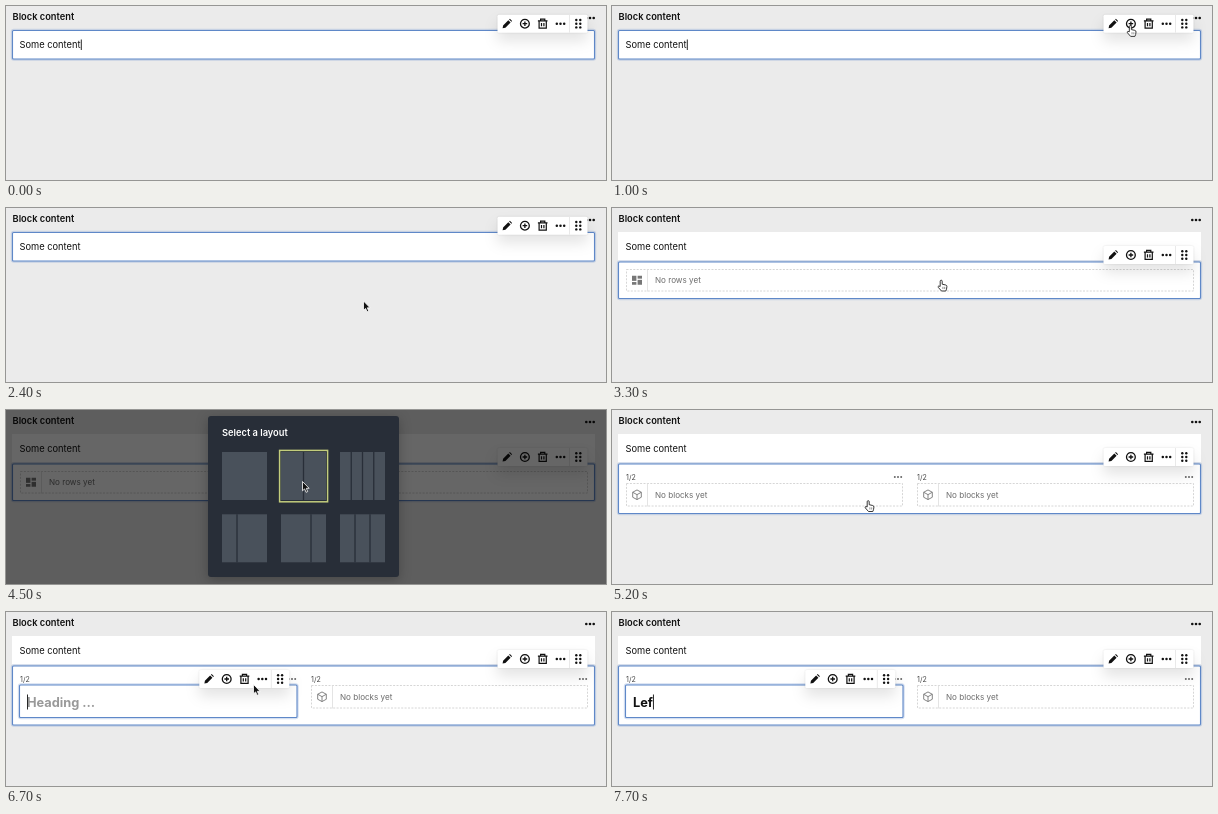
An HTML page that plays this animation: 600 by 174 pixels, repeating every 8000 ms.

```html
<!DOCTYPE html>
<html lang="en">
<head>
<meta charset="utf-8">
<title>Block editor</title>
<style>
html, body { margin: 0; width: 600px; height: 174px; overflow: hidden; background: #ebebeb; }
svg { display: block; }
text { font-family: Inter, "Open Sans", sans-serif; white-space: pre; }
.mono { font-family: "DejaVu Sans Mono", monospace; }
.bar { filter: drop-shadow(0 0 1px rgba(0,0,0,.12)) drop-shadow(0 8px 7px rgba(0,0,0,.11)); }
.dialog { filter: drop-shadow(0 3px 6px rgba(0,0,0,.25)); }
</style>
</head>
<body>
<svg id="stage" width="600" height="174" viewBox="0 0 600 174"></svg>
<script>
const LOOP = 8000, TICK = 100;
const PANEL = '#282e38', ITEM = '#14171b', GREEN = '#c9dba0', MUTED = '#b4b7bb';

// ---- drawing helpers (boxes are given by their edges) ----
const rect = (x1, y1, x2, y2, fill, extra = '') =>
  `<rect x="${x1}" y="${y1}" width="${x2 - x1}" height="${y2 - y1}" fill="${fill}" ${extra}/>`;
const text = (x, cy, size, str, fill = '#111', extra = '') =>
  `<text x="${x}" y="${cy + size * .36}" font-size="${size}" fill="${fill}" ${extra}>${str}</text>`;
const line = (d, color, width = 1, extra = '') =>
  `<path d="${d}" fill="none" stroke="${color}" stroke-width="${width}" ${extra}/>`;
const shape = (d, fill) => `<path d="${d}" fill="${fill}"/>`;
const at = (x, y, body) => `<g transform="translate(${x} ${y})">${body}</g>`;
const group = (id, body, extra = '') => `<g id="${id}" ${extra}>${body}</g>`;
const dot = (x, y, r, fill = '#111') => `<circle cx="${x}" cy="${y}" r="${r}" fill="${fill}"/>`;
const dots = (x, y, gap, r, fill) => [-gap, 0, gap].map(dx => dot(x + dx, y, r, fill)).join('');

// ---- icons, centred on 0,0 ----
const icons = {
  pencil: shape('M-4.5 4.5L-4 1.7 1.2-3.5 3.5-1.2-1.7 4zM2-4.3L2.8-5 5-2.8 4.3-2z', '#111'),
  plus: line('M-4.4 0a4.4 4.4 0 1 0 8.8 0a4.4 4.4 0 1 0-8.8 0M-2.3 0H2.3M0-2.3V2.3', '#111', 1.3),
  trash: line('M-4.8-2.9H4.8M-2.1-2.9V-4.6H2.1V-2.9M-3.6-2.9V4.4H3.6V-2.9M-1.2-.7V2.5M1.2-.7V2.5', '#111', 1.2),
  more: dots(0, 0, 3.7, 1.25),
  grip: [-2, 2].map(x => [-3.7, 0, 3.7].map(y => dot(x, y, 1.2)).join('')).join(''),
  lines: line('M-5-4H5M-5-1.2H1.5M-5 1.6H5M-5 4.4H1.5', '#fff', 1.3),
  columns: rect(-5, -4.5, 0, 4.5, '#fff') + rect(0, -4.5, 5, 4.5, '#4a4e54'),
  heading: line('M-5-3.9H2M-1.5-3.9V4.5M.5-.6H5M2.8-.6V4.5', '#fff', 1.4),
  layout: rect(-5, -4.5, -.6, .6, '#777') + rect(.6, -4.5, 5, -1.6, '#777') +
    rect(-5, 1.8, -.6, 4.5, '#777') + rect(.6, -.4, 5, 4.5, '#777'),
  box: line('M0-4.8L4.3-2.5V2.5L0 4.8-4.3 2.5V-2.5zM-4.3-2.5L0-.1 4.3-2.5M0-.1V4.8', '#777', .9)
};

function toolbar(x, y) {
  const names = ['pencil', 'plus', 'trash', 'more', 'grip'];
  const cells = names.map((name, i) => at(9.6 + i * 17.8, 9, icons[name])).join('');
  return at(x, y, rect(0, 0, 90, 18, '#fff', 'rx="1.5" class="bar"') +
    line('M72 0V18', '#e9e9e9') + cells);
}

const focusBox = (x1, y1, x2, y2) =>
  rect(x1, y1, x2, y2, '#fff', 'stroke="#7096d0" stroke-opacity=".3" stroke-width="3.4" rx="1.5"') +
  rect(x1, y1, x2, y2, '#fff', 'stroke="#5f88c8" stroke-width="1.1" rx="1"');

const emptyBox = (x1, y1, x2, y2, icon, label) =>
  rect(x1 + .5, y1 + .5, x2 - .5, y2 - .5, '#fff', 'stroke="#ccc" stroke-width=".8" stroke-dasharray="2 1.4"') +
  line(`M${x1 + 21.5} ${y1}V${y2}`, '#ddd', .8) +
  at(x1 + 11, (y1 + y2) / 2, icons[icon]) +
  text(x1 + 29, (y1 + y2) / 2, 8.1, label, '#6c6c6c');

const column = (x1, x2) =>
  text(x1, 67, 7.1, '1/2', '#444') + dots(x2 - 5, 67, 3.2, 1, '#666');

// ---- pages ----
const plainText = rect(6, 24, 589, 52.5, '#fff') + text(13.5, 38.5, 9.3, 'Some content');
const rightColumn = column(305, 582) + emptyBox(305, 73, 582, 96.5, 'box', 'No blocks yet');

const pages = {
  text: focusBox(6.5, 24.5, 588.5, 53) +
    text(13.5, 38.5, 9.3, 'Some content', '#111', 'id="copy"') + toolbar(491.5, 8.7),
  rows: plainText + focusBox(6.5, 54, 588.5, 90.5) +
    emptyBox(14, 61, 582, 83.5, 'layout', 'No rows yet') + toolbar(491.5, 38),
  cols: plainText + focusBox(6.5, 54, 588.5, 103.5) + column(14, 291) +
    emptyBox(14, 73, 291, 96.5, 'box', 'No blocks yet') + rightColumn + toolbar(491.5, 38),
  title: plainText + focusBox(6.5, 54, 588.5, 113) + column(14, 291) + rightColumn +
    focusBox(13.5, 73, 291, 105.5) + text(21, 90, 12.8, '', '#111', 'id="heading" font-weight="700"') +
    toolbar(193.3, 58) + toolbar(491.5, 38)
};

// ---- dialogs ----
const shade = rect(0, 0, 600, 174, '#000', 'opacity=".6"');

function typeDialog(id, items) {
  const rows = items.map(([icon, label], i) => {
    const y = 60 + i * 23.8;
    return rect(168, y, 427, y + 22.2, ITEM, i ? '' : `stroke="${GREEN}" stroke-width="1.4" rx="1"`) +
      at(179.5, y + 11.1, icons[icon]) +
      text(196, y + 11.1, 8.1, label, i ? MUTED : '#fff', `id="${id}-${i}"`);
  }).join('');
  return shade + rect(154, 30.5, 441, 142, PANEL, 'rx="3" class="dialog"') +
    shape('M168.3 46.3H173L170.6 50.2z', '#e6e7e9') +
    text(176, 48, 7.1, 'Please select a block type …', '#dcdee1') + rows +
    text(168, 124, 7.1, 'Press', '#d3d5d8') +
    rect(191.5, 118, 222, 130.3, ITEM, 'rx="1"') +
    text(195.3, 124, 7.6, 'cmd+v', '#e6e7e9', 'class="mono"') +
    text(226, 124, 7.1, 'to paste/import blocks from your clipboard', '#d3d5d8');
}

function layoutDialog() {
  const splits = [[], [.5], [.25, .5, .75], [1 / 3], [2 / 3], [1 / 3, 2 / 3]];
  const tiles = splits.map((cuts, i) => {
    const x = 216 + (i % 3) * 59, y = i < 3 ? 42 : 104.3;
    return rect(x, y, x + 45, y + 48, '#49515b') +
      cuts.map(c => line(`M${x + 45 * c} ${y}v48`, PANEL, 1.3)).join('');
  }).join('');
  return shade + rect(202, 6, 393, 167, PANEL, 'rx="3" class="dialog"') +
    text(216, 23, 9.3, 'Select a layout', '#fff', 'font-weight="600"') + tiles +
    rect(273.6, 40.4, 321.6, 91.8, 'none', 'id="pick" stroke="#c3cd7c" stroke-width="1.5"');
}

const dialogs = {
  first: typeDialog('first', [['lines', 'Text'], ['columns', 'Columns']]),
  layouts: layoutDialog(),
  second: typeDialog('second', [['heading', 'Heading'], ['lines', 'Text']])
};

// ---- cursors, hot spot on 0,0 ----
const pointers = {
  arrow: '<path d="M0 0V9.3L2.1 7.4 3.6 10.8 5.2 10.1 3.8 6.8H6.6z" fill="#111" stroke="#fff" stroke-width=".8"/>',
  hand: '<path d="M-1.3 6.4V1.2a1 1 0 0 1 2 0V4.2L4.2 5q1.3.3 1.2 1.6L5 9.2 4.3 11H0L-3.2 7.4q-.6-1 .4-1.4z" ' +
    'fill="#fff" stroke="#222" stroke-width=".9" stroke-linejoin="round"/>' + line('M1.4 6.8V9M3.2 6.9V9', '#222', .5)
};

const layers = set => Object.entries(set).map(([id, body]) => group(id, body)).join('');
const $ = id => document.getElementById(id);
$('stage').innerHTML = rect(0, 0, 600, 174, '#ebebeb') +
  text(6.5, 11, 9.3, 'Block content', '#111', 'font-weight="600"') + dots(584, 12, 3.7, 1.3) +
  layers(pages) + rect(0, 0, .9, 10, '#111', 'id="caret"') + layers(dialogs) +
  group('cursor', layers(pointers));

// ---- timeline ----
const scenes = [
  [0, 'text'], [1300, 'text', 'first'], [2300, 'text'], [2500, 'rows'], [3600, 'rows', 'layouts'],
  [4600, 'cols'], [5400, 'cols', 'second'], [6500, 'cols'], [6700, 'title']
];
const kinds = [
  [0, ''], [200, 'arrow'], [400, 'hand'], [1300, 'arrow'], [2000, 'hand'], [2300, 'arrow'],
  [3100, 'hand'], [3600, 'arrow'], [5100, 'hand'], [6500, 'arrow'], [7300, '']
];
const typing = [[0, ''], [7300, 'L'], [7600, 'Le'], [7700, 'Lef']];
// start, steps, end point
const moves = [
  [200, 4, 519, 19], [900, 3, 518.5, 19.5], [1600, 6, 357.5, 93], [2900, 5, 329.5, 72],
  [3800, 3, 296.5, 71.5], [5000, 3, 256.5, 90.5], [6000, 3, 247.5, 72.5]
];

const pick = (table, t) => table.filter(row => row[0] <= t).pop();
const show = (id, on) => $(id).setAttribute('visibility', on ? 'visible' : 'hidden');
const showOne = (set, name) => Object.keys(set).forEach(id => {
  $(id).style.display = id === name ? '' : 'none';
});

function cursorAt(t) {
  let x = 543, y = -8;
  for (const [start, steps, tx, ty] of moves) {
    if (t < start) break;
    const p = Math.min(1, ((t - start) / TICK + 1) / steps);
    const ease = p * p * (3 - 2 * p);
    x += (tx - x) * ease;
    y += (ty - y) * ease;
  }
  return [x, y];
}

function placeCaret(x, y, height) {
  $('caret').setAttribute('x', x);
  $('caret').setAttribute('y', y);
  $('caret').setAttribute('height', height);
}

function draw(t) {
  const [, page, dialog] = pick(scenes, t);
  showOne(pages, page);
  showOne(dialogs, dialog);
  showOne(pointers, pick(kinds, t)[1]);
  $('cursor').setAttribute('transform', `translate(${cursorAt(t)})`);
  $('first-1').setAttribute('fill', t >= 2000 ? '#fff' : MUTED);
  $('second-1').setAttribute('fill', t < 6100 ? '#fff' : MUTED);
  show('pick', t >= 3900);

  const word = pick(typing, t)[1], heading = $('heading');
  heading.textContent = word || 'Heading …';
  heading.setAttribute('fill', word ? '#111' : '#999');
  if (page === 'title') placeCaret(21 + (word ? heading.getComputedTextLength() : 0), 82.5, 15);
  else if (page === 'text') placeCaret(13.8 + $('copy').getComputedTextLength(), 33.5, 10.5);
  show('caret', t < 500 || (t >= 1000 && t < 1300) || page === 'title');
}

const began = performance.now();
function tick() {
  const t = (performance.now() - began) % LOOP;
  draw(Math.floor(t / TICK) * TICK);
  requestAnimationFrame(tick);
}
tick();
</script>
</body>
</html>
```
